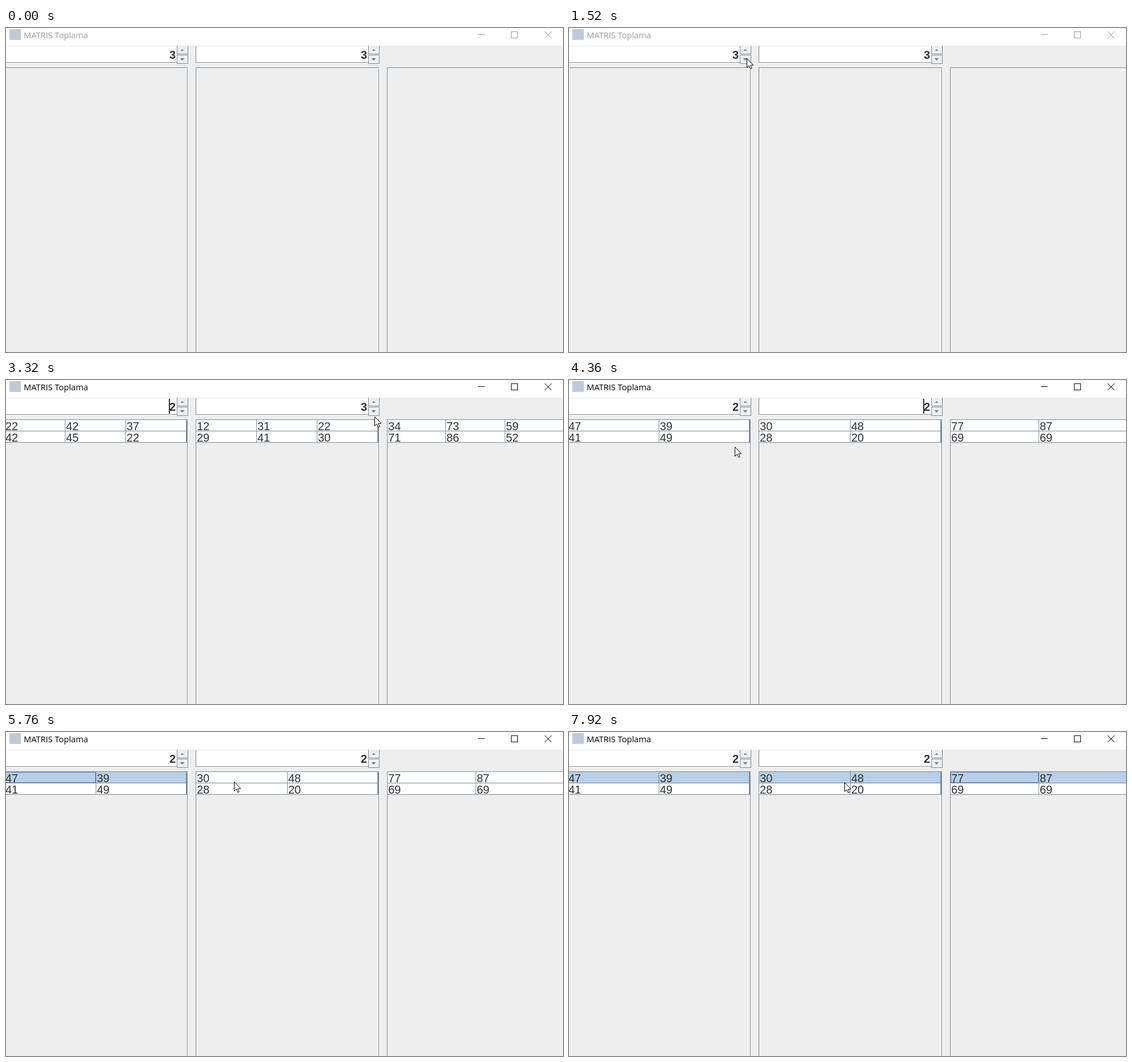
Animation, 975 px wide and 568 px high, one loop 8000 ms. Source, as an HTML page:

```html
<!DOCTYPE html>
<html lang="tr">
<head>
<meta charset="utf-8">
<title>MATRIS Toplama</title>
<style>
  html, body { margin: 0; width: 100%; height: 100%; overflow: hidden; background: #eee; }
  svg { display: block; width: 100vw; height: 100vh; }
  rect { shape-rendering: crispEdges; }
  text { font: 20px "Liberation Sans", Arial, sans-serif; fill: #333; }
  .value { font-weight: bold; text-anchor: end; }
  .title { font: 14.6px "Open Sans", "Noto Sans", sans-serif; fill: currentColor; }
</style>
</head>
<body>
<svg id="stage" viewBox="0 0 975 568"></svg>
<script>
const LOOP = 8000, TICK = 40;
const PITCH = 335, ROW = 20, TOP = 70;
const LINE = '#7a8a99', PANEL = '#eee', PICK = '#b8cfe5', FOCUS = '#6382bf';
const stage = document.getElementById('stage');

function add(parent, tag, attrs, text) {
  const el = document.createElementNS('http://www.w3.org/2000/svg', tag);
  for (const key in attrs) el.setAttribute(key, attrs[key]);
  if (text !== undefined) el.textContent = text;
  parent.appendChild(el);
  return el;
}
const group = () => add(stage, 'g', {});
const box = (parent, x, y, width, height, fill) =>
  add(parent, 'rect', { x, y, width, height, fill });
const frame = (parent, x, y, w, h, stroke, fill = 'none') =>
  add(parent, 'rect', { x: x + .5, y: y + .5, width: w - 1, height: h - 1, fill, stroke });
const show = (el, on) => el.setAttribute('display', on ? 'inline' : 'none');
const within = (t, a, b) => t >= a && t < b;

// Title bar
box(stage, 0, 0, 975, 568, PANEL);
box(stage, 0, 0, 975, 31, '#fff');
box(stage, 6, 2, 20, 19, '#bccbdb');
const bar = group();
add(bar, 'text', { x: 31, y: 18, class: 'title' }, 'MATRIS Toplama');
box(bar, 826, 11, 12, 1, 'currentColor');
frame(bar, 884, 6, 12, 12, 'currentColor');
add(bar, 'path', { d: 'M943 6l12 12m0-12l-12 12', stroke: 'currentColor' });

// Number field with its two step buttons
function makeSpinner(x) {
  const g = group(), bx = x + 302, mid = bx + 9.5;
  box(g, x + 1, 32, 301, 30, '#fff');
  box(g, x, 31, 1, 30, LINE);
  box(g, x, 60, 302, 1, LINE);
  const caret = box(g, x + 288, 33, 2, 26, '#333');
  const value = add(g, 'text', { x: x + 300, y: 54, class: 'value' });
  frame(g, bx, 29, 20, 17, LINE, PANEL);
  box(g, bx, 29, 20, 2, '#fff');
  box(g, bx, 46, 20, 1, '#fff');
  frame(g, bx, 47, 20, 16, LINE, PANEL);
  const hover = frame(g, bx + 1, 48, 18, 14, '#a3b8cc', '#dde8f3');
  const press = box(g, bx + 2, 49, 16, 12, PICK);
  add(g, 'path', { d: `M${mid - 3} 40h6l-3-3z`, fill: '#697885' });
  add(g, 'path', { d: `M${mid - 4} 53h8l-4 4z`, fill: '#697885' });
  return { caret, value, press, hover };
}

function makePane(x) {
  const right = x + 320;
  box(stage, x, TOP - 1, 321, 1, LINE);
  box(stage, x, TOP - 1, 1, 499, LINE);
  box(stage, right, TOP - 1, 1, 499, LINE);
  box(stage, right, TOP + 1, 1, 1, PANEL);
  box(stage, right + 1, TOP, 1, 498, '#fff');
}

// Columns share the width evenly from origin
function makeTable(pane, origin, width, rows) {
  const g = group(), cols = rows[0].length, left = pane + 1, right = pane + 318;
  const edge = c => origin - 1 + c * Math.round(width / cols);
  box(g, left, TOP, right - left, 2 * ROW, '#fff');
  const pick = box(g, left, TOP, right - left, ROW - 1, PICK);
  const focus = frame(g, left, TOP, edge(1) - left, ROW - 1, FOCUS);
  rows.forEach((row, r) => {
    box(g, left, TOP + (r + 1) * ROW - 1, right - left, 1, LINE);
    row.forEach((n, c) => {
      const x = c ? edge(c) : pane;
      if (c) box(g, x, TOP, 1, 2 * ROW, LINE);
      add(g, 'text', { x: x + 2, y: TOP + r * ROW + 18 }, n);
    });
  });
  box(g, right, TOP, 2, 2 * ROW, LINE);
  return { g, pick, focus };
}

// Two operands and their computed sum
function makeSum(a, b) {
  const sum = a.map((row, r) => row.map((n, c) => n + b[r][c]));
  return [
    makeTable(panes[0], panes[0] + 1, 319, a),
    makeTable(panes[1], panes[1] + 1, 319, b),
    makeTable(panes[2], panes[2] - 1, 313, sum)
  ];
}

const panes = [0, 1, 2].map(i => i * PITCH - 3);
const spinners = panes.slice(0, 2).map(makeSpinner);
panes.forEach(makePane);
const wide = makeSum([[22, 42, 37], [42, 45, 22]], [[12, 31, 22], [29, 41, 30]]);
const narrow = makeSum([[47, 39], [41, 49]], [[30, 48], [28, 20]]);
const clicks = [5360, 6320, 7320, LOOP];

const pointer = add(stage, 'path', {
  d: 'M.5 .5V16.5L4.2 13L6.7 18.5H8.5L9 17.5L6.8 12.2H11.7Z',
  fill: '#fff', stroke: '#000'
});

// Pointer moves: begin, end, x, y
const entry = [755, 529];
const moves = [
  [280, 760, 343, 136], [760, 1240, 297, 47], [1360, 1520, 311, 53],
  [2400, 3320, 645, 64], [3400, 3640, 642, 55], [4080, 4360, 290, 117],
  [4720, 5000, 110, 82], [5520, 5760, 399, 87], [6120, 6160, 395, 87],
  [6400, 7040, 701, 94], [7120, 7360, 694, 83], [7600, 7920, 482, 88]
];
const ease = u => u * (2 - u);

function locate(t) {
  const now = Math.floor(t / TICK) * TICK;
  let [x, y] = entry;
  for (const [begin, end, tx, ty] of moves) {
    if (now < begin) break;
    const u = ease(Math.min(1, (now - begin) / (end - begin)));
    x += (tx - x) * u;
    y += (ty - y) * u;
  }
  return [Math.round(x), Math.round(y)];
}

function draw(t) {
  bar.setAttribute('color', t < 1920 ? '#999' : '#000');

  const [a, b] = spinners;
  a.value.textContent = t < 2080 ? 3 : 2;
  b.value.textContent = t < 3880 ? 3 : 2;
  show(a.caret, within(t, 1920, 2480) || within(t, 2960, 3480));
  show(b.caret, within(t, 3800, 4120) || within(t, 4320, 5360));
  show(a.press, within(t, 1920, 2080));
  show(b.press, within(t, 3800, 3880));
  show(a.hover, within(t, 1920, 2480));
  show(b.hover, within(t, 3640, 4120));

  wide.forEach(table => {
    show(table.g, within(t, 2080, 3880));
    show(table.pick, false);
    show(table.focus, false);
  });
  narrow.forEach((table, i) => {
    show(table.g, t >= 3880);
    show(table.pick, t >= clicks[i]);
    show(table.focus, within(t, clicks[i], clicks[i + 1]));
  });

  show(pointer, t >= 280);
  pointer.setAttribute('transform', `translate(${locate(t)})`);
}

const start = performance.now();
function tick() {
  draw((performance.now() - start) % LOOP);
  requestAnimationFrame(tick);
}
draw(0);
requestAnimationFrame(tick);
</script>
</body>
</html>
```
